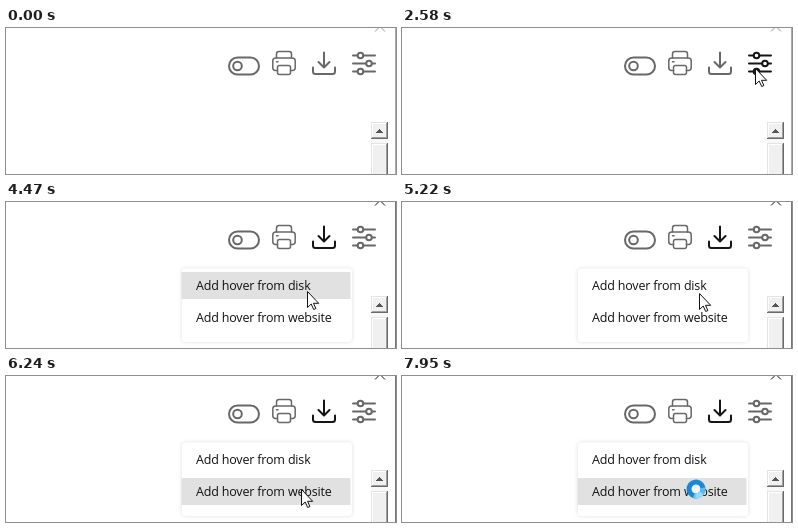
These frames come from a looping animation (390x146 px, 8 s). An HTML page:

```html
<!DOCTYPE html>
<html lang="en">
<head>
<meta charset="utf-8">
<title>Download menu</title>
<style>
  html, body { margin: 0; width: 100%; height: 100%; overflow: hidden; background: #fff; }
  svg { display: block; }
  .icon { fill: none; stroke: #686868; stroke-width: 2; stroke-linecap: round; stroke-linejoin: round; }
  .icon.dark { stroke: #151515; }
  .crisp { shape-rendering: crispEdges; }
  .panel { fill: #fff; filter: drop-shadow(0 0 2px #0002); }
  text { font: 12.5px "Open Sans", "Noto Sans", sans-serif; letter-spacing: -.18px; fill: #111; }
</style>
</head>
<body>
<svg width="390" height="146" viewBox="0 0 390 146">
  <path id="close" d="M369 -6.5l10 10M379 -6.5l-10 10" fill="none"/>
  <path id="edge" class="crisp" d="M389.5 0V146"/>

  <g class="icon">
    <rect x="223" y="29.5" width="30" height="17" rx="8.5"/>
    <circle cx="231.5" cy="38" r="4.3"/>
  </g>
  <g class="icon" style="stroke-width:1.5">
    <path d="M270.5 30v-4q0-2.5 2.5-2.5h10q2.500 0 2.500 2.500v4"/>
    <path d="M271.500 42.500h-2q-2.700 0-2.700-2.700v-6.800q0-3 3-3h16.400q3 0 3 3v6.800q0 2.700-2.700 2.700h-2"/>
    <rect x="271.500" y="37.500" width="13" height="9" rx="2"/>
    <path d="M270.500 33.800h1.500"/>
  </g>
  <path id="download" class="icon" d="M318 24.500V39M312.500 34l5.500 5.500 5.500-5.500M307 39.500v4q0 2.500 2.500 2.500h17q2.500 0 2.500-2.500v-4"/>
  <g id="settings" class="icon">
    <path d="M347 27.500h4.500M357.500 27.500H369M347 35.500h13M366 35.500h3M347 43.500h4.500M357.500 43.500H369"/>
    <circle cx="354.500" cy="27.500" r="2.800"/>
    <circle cx="363" cy="35.500" r="2.800"/>
    <circle cx="354.500" cy="43.500" r="2.800"/>
  </g>

  <g class="crisp" fill="none">
    <path d="M365 94h17v52h-17z" fill="#f8f8f8"/>
    <path d="M365 94h17v17h-17zM365 115h17v40h-17z" fill="#f0f0f0"/>
    <path d="M365.500 111V94.500H381M365.500 146V115.500H381" stroke="#e3e3e3"/>
    <path d="M366.500 109V95.500H380M366.500 146V116.500H380" stroke="#fff"/>
    <path d="M366 109.500H380.500V95M380.500 146V116" stroke="#a0a0a0"/>
    <path d="M365 110.500H381.500V94M381.500 146V115" stroke="#696969"/>
    <path d="M370 105h7l-3.500-4z" fill="#555"/>
  </g>

  <g id="menu">
    <rect class="panel" x="176" y="66.500" width="170" height="73.500" rx="4"/>
    <rect id="row1" x="175.500" y="70" width="169" height="27" rx="1" fill="#e1e1e1"/>
    <rect id="row2" x="175.500" y="102" width="169" height="27" rx="1" fill="#e1e1e1"/>
    <text x="190" y="88">Add hover from disk</text>
    <text x="190" y="120">Add hover from website</text>
  </g>

  <path id="cursor" d="M.5.5v16l3.700-3.500 2.500 5.500 2.200-1-2.400-5.200h5.200z" fill="#fff" stroke="#111"/>
  <g id="busy" fill="none" stroke-width="5">
    <circle r="7" fill="#eef6fc" stroke="#1c87d2"/>
    <path d="M0-7A7 7 0 0 1 6.060 3.500" stroke="#5cb8ee"/>
    <path d="M4.950-4.950A7 7 0 0 1 6.760 1.810" stroke="#9ad8f8"/>
  </g>
</svg>
<script>
const $ = id => document.getElementById(id);
const between = (t, ...spans) => spans.some(([a, b]) => t >= a && t < b);
const show = (id, on) => $(id).style.display = on ? '' : 'none';

// Pointer path: time, x, y
const path = [
  [0, 372, 150], [560, 372, 148], [800, 354, 108], [1050, 326, 62], [1300, 316, 41],
  [1729, 316, 41], [1730, 317, 41], [2110, 317, 41], [2420, 352, 42], [2560, 356, 41],
  [2870, 319, 32], [3740, 319, 32], [4060, 305, 83], [4440, 305, 83], [4470, 301, 89],
  [4760, 297, 113], [5090, 297, 113], [5220, 297, 91], [5280, 297, 87], [5780, 297, 87],
  [6240, 295, 113], [8000, 295, 113]
];

function pointer(t) {
  const i = path.findIndex(p => p[0] > t);
  const [t0, x0, y0] = path[i - 1], [t1, x1, y1] = path[i];
  const k = (t - t0) / (t1 - t0);
  return [Math.round(x0 + (x1 - x0) * k), Math.round(y0 + (y1 - y0) * k)];
}

function draw(now) {
  const t = now % 8000, active = t >= 3130, busy = t >= 6620;
  $('close').setAttribute('stroke', active ? '#111' : '#999');
  $('edge').setAttribute('stroke', active ? '#777' : '#aaa');
  $('download').classList.toggle('dark', between(t, [1180, 2220], [2770, 8000]));
  $('settings').classList.toggle('dark', between(t, [2370, 2650]));
  $('menu').style.opacity = active ? Math.min(1, (t - 3090) / 160) : 0;
  show('row1', between(t, [3980, 4560], [5280, 5950]));
  show('row2', between(t, [4640, 5160], [6050, 8000]));
  show('cursor', !busy);
  show('busy', busy);
  $('cursor').setAttribute('transform', `translate(${pointer(t)})`);
  const turn = Math.floor((t - 6620) / 33) * 20;
  $('busy').setAttribute('transform', `translate(294 113) rotate(${turn})`);
  requestAnimationFrame(() => draw(performance.now()));
}
draw(performance.now());
</script>
</body>
</html>
```
